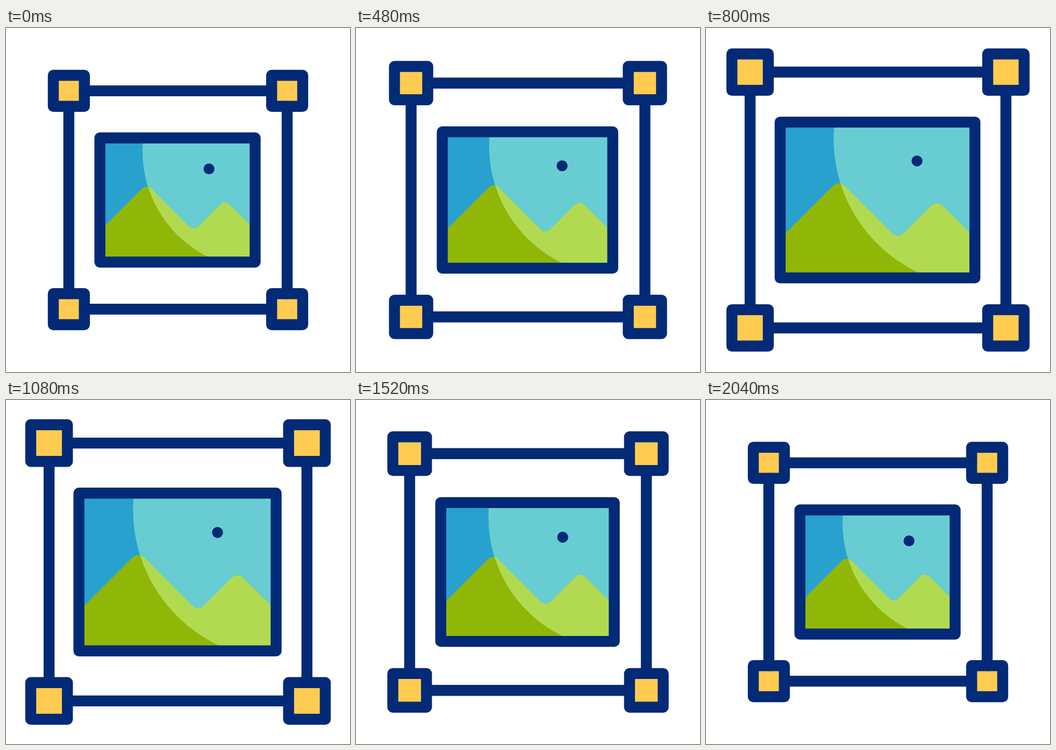
An HTML page for the animation above (2480 ms loop, 640 px wide and 640 px high).

```html
<!DOCTYPE html>
<html lang="en">
<head>
<meta charset="utf-8">
<title>Image resize</title>
<style>
  html, body { margin: 0; width: 100%; height: 100%; overflow: hidden; background: #fff; }
  svg { display: block; width: 100%; height: 100%; }
  .line { stroke: #032a76; stroke-linejoin: round; stroke-linecap: round; }
</style>
</head>
<body>
<svg viewBox="0 0 640 640">
  <defs>
    <path id="hills" d="M174.7 377.3 L252.2 299.8 Q261.8 290.2 271.4 299.8 L339.6 368.2
      Q349.2 377.8 358.8 368.2 L397.4 329.6 Q407 320 416.6 329.6 L463.5 376.5 V435.5 H174.7 Z"/>
    <clipPath id="frameClip"><rect x="174.7" y="204.5" width="288.8" height="231"/></clipPath>
    <clipPath id="glowClip"><circle cx="474" cy="229" r="220"/></clipPath>
  </defs>
  <g id="handles" class="line" fill="#ffcb50"></g>
  <g id="picture" class="line" fill="none">
    <g clip-path="url(#frameClip)" stroke="none">
      <rect x="174.7" y="204.5" width="288.8" height="231" fill="#28a1ce"/>
      <circle cx="474" cy="229" r="220" fill="#68cdd2"/>
      <use href="#hills" fill="#90b607"/>
      <g clip-path="url(#glowClip)"><use href="#hills" fill="#b1da51"/></g>
    </g>
    <rect x="174.7" y="204.5" width="288.8" height="231"/>
    <path d="M377.7 262.1 h0"/>
  </g>
</svg>
<script>
const LOOP = 2480, STEP = 40;
const START = 38, PEAK = 1010, END = 2000;
const STROKE = 20.4, REACH = 203.1, HALF = 28.9;
const handles = document.getElementById('handles');
const picture = document.getElementById('picture');

// Corner squares, then the four sides running between them.
const signs = [-1, 1];
const near = REACH - HALF;
let shapes = '';
for (const sx of signs) for (const sy of signs) {
  shapes += `<rect x="${sx * REACH - HALF}" y="${sy * REACH - HALF}" width="${2 * HALF}" height="${2 * HALF}"/>`;
}
for (const s of signs) {
  shapes += `<path d="M${-near} ${s * REACH} H${near} M${s * REACH} ${-near} V${near}"/>`;
}
handles.innerHTML = shapes;

// Cubic bezier easing (0.6, 0, 0.4, 1), solved by bisection.
function ease(x) {
  if (x <= 0) return 0;
  if (x >= 1) return 1;
  let lo = 0, hi = 1;
  for (let i = 0; i < 30; i++) {
    const u = (lo + hi) / 2, v = 1 - u;
    if (1.8 * u * v * v + 1.2 * u * u * v + u * u * u < x) lo = u; else hi = u;
  }
  return lo * lo * (3 - 2 * lo);
}

// Scales the shape while the line weight stays constant.
function resize(group, scale, place) {
  group.setAttribute('transform', place + ` scale(${scale})`);
  group.setAttribute('stroke-width', STROKE / scale);
}

function draw(time) {
  const t = Math.floor((time % LOOP) / STEP) * STEP;
  const p = t < PEAK
    ? ease((t - START) / (PEAK - START))
    : 1 - ease((t - PEAK) / (END - PEAK));
  resize(handles, 1 + 0.182 * p, 'translate(320 320)');
  const k = 1 + 0.24 * p + 0.032 * p * p;
  resize(picture, k, `translate(${319.1 * (1 - k)} ${320 * (1 - k)})`);
}

const origin = performance.now();
function tick() {
  draw(performance.now() - origin);
  requestAnimationFrame(tick);
}
tick();
</script>
</body>
</html>
```
